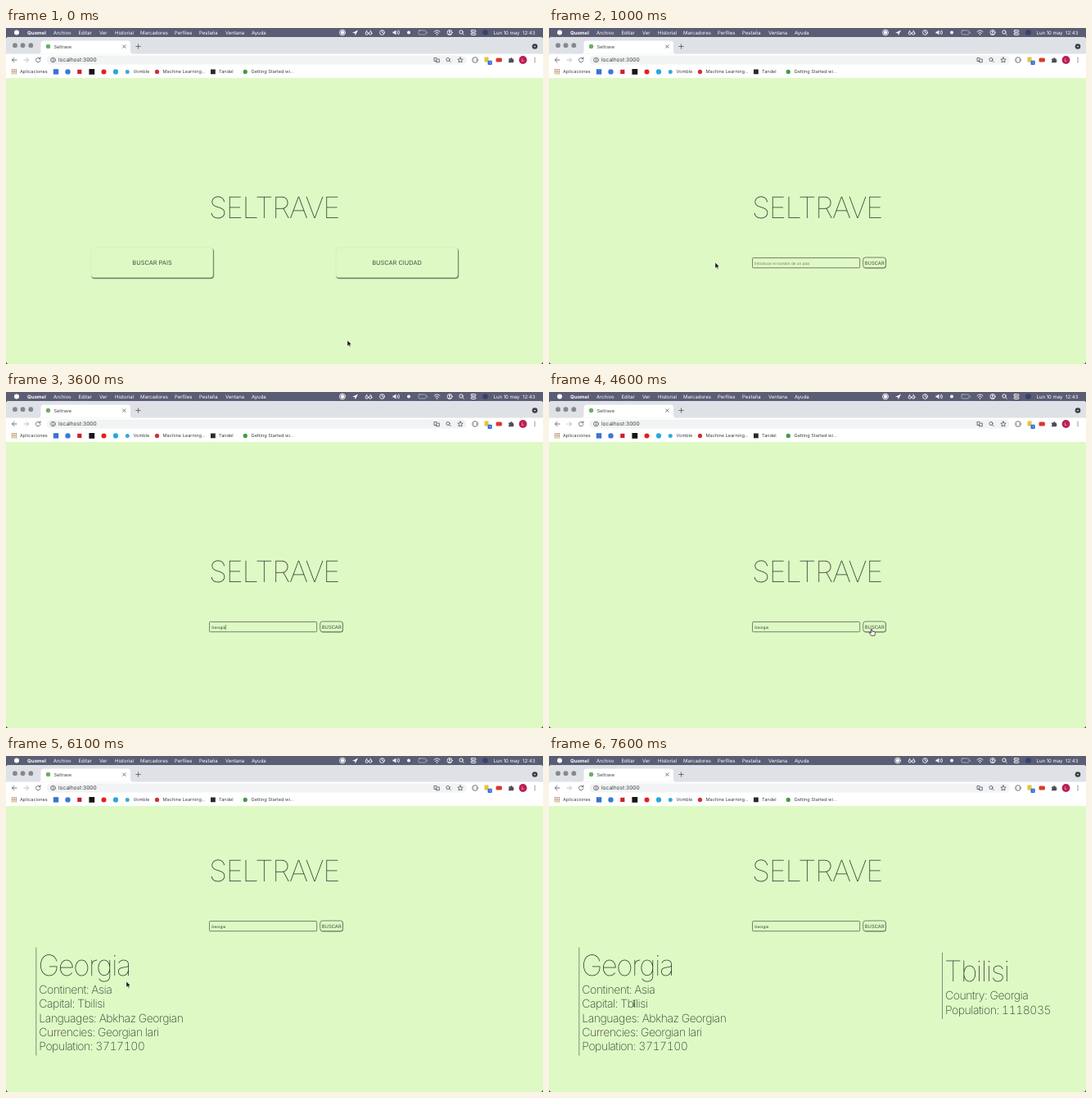
An HTML page for the animation above (8 s loop, 656 by 410 pixels).

```html
<!DOCTYPE html>
<html lang="es">
<head>
<meta charset="utf-8">
<title>Seltrave</title>
<style>
html, body { margin: 0; width: 100%; height: 100%; overflow: hidden; background: #2b2d3f; }
svg { display: block; width: 656px; height: 410px; font-family: Inter, "Open Sans", sans-serif; text-rendering: geometricPrecision; }

.menu text { font-size: 6px; fill: #fff; }
.menu .bold { font-weight: 700; }
.bar text { font-size: 5.6px; fill: #3c4043; }
.bar .url { font-size: 6.6px; }
.line { fill: none; stroke: #5f6368; stroke-width: .9; stroke-linecap: round; stroke-linejoin: round; }
.menu .line { stroke: #fff; }

.page { fill: #2f3d31; }
.title { font-size: 36px; font-weight: 100; letter-spacing: -.034em; text-anchor: middle; }
.name { font-size: 35px; font-weight: 100; letter-spacing: -.045em; }
.facts { font-size: 14px; font-weight: 200; letter-spacing: -.034em; font-variant-numeric: tabular-nums; }
.big { font-size: 7.4px; text-anchor: middle; }
.small { font-size: 5.9px; text-anchor: middle; }
.big, .small { fill: #435040; }
.field { font-size: 4.6px; }
.hint { fill: #6f7a6b; }
.box { fill: #dff9c5; stroke: #4f5d48; stroke-width: .75; }
.rule { stroke: #75846c; stroke-width: .9; }

.home, .search, .lift, .country, .city, .hint, .typed, .rec, .loc, .caret,
.arrow, .hand, .beam { animation: 8s step-end infinite; }
.home { animation-name: home; }
.search { animation-name: search; }
.lift { animation-name: lift; }
.country { animation-name: country; }
.city { animation-name: city; }
.hint { animation-name: hint; }
.typed { animation-name: typed; }
.rec { animation-name: rec; }
.loc { animation-name: loc; }
.caret { animation-name: caret; }
.arrow { animation-name: arrow; }
.hand { animation-name: hand; }
.beam { animation-name: beam; }
.cursor { animation: move 8s ease-in-out infinite; }

/* Each letter stays on until its hidden parent takes over in the next loop. */
.typed tspan { fill-opacity: 0; animation: letter 8s step-end infinite var(--at); }
@keyframes letter { 0% { fill-opacity: 1 } 68% { fill-opacity: 0 } }

@keyframes home { 0% { visibility: visible } 12.5% { visibility: hidden } }
@keyframes search { 0% { visibility: hidden } 12.5% { visibility: visible } }
@keyframes lift { 0% { transform: translateY(0) } 60% { transform: translateY(-79px) } }
@keyframes country { 0% { visibility: hidden } 60% { visibility: visible } }
@keyframes city { 0% { visibility: hidden } 86.25% { visibility: visible } }
@keyframes hint { 0% { visibility: hidden } 12.5% { visibility: visible } 32.5% { visibility: hidden } }
@keyframes typed { 0% { visibility: hidden } 32.5% { visibility: visible } }
@keyframes rec { 0% { transform: translateX(0) } 78.75% { transform: translateX(15px) } }
@keyframes loc { 0% { visibility: visible } 78.75% { visibility: hidden } }
@keyframes caret {
  0% { visibility: hidden; transform: translateX(0) }
  28.75% { visibility: visible; transform: translateX(0) }
  32.5% { visibility: visible; transform: translateX(3.4px) }
  36.25% { visibility: visible; transform: translateX(6.1px) }
  37.5% { visibility: visible; transform: translateX(8.9px) }
  38.75% { visibility: visible; transform: translateX(10.6px) }
  40% { visibility: visible; transform: translateX(13.4px) }
  41.25% { visibility: visible; transform: translateX(14.5px) }
  43.75% { visibility: visible; transform: translateX(17.2px) }
  50% { visibility: hidden; transform: translateX(17.2px) }
}
@keyframes arrow {
  0% { visibility: visible } 7.5% { visibility: hidden }
  12.5% { visibility: visible } 22.5% { visibility: hidden }
  60% { visibility: visible } 78.75% { visibility: hidden }
}
@keyframes hand {
  0% { visibility: hidden } 7.5% { visibility: visible } 12.5% { visibility: hidden }
  54.5% { visibility: visible } 60% { visibility: hidden }
}
@keyframes beam {
  0% { visibility: hidden } 22.5% { visibility: visible } 32.5% { visibility: hidden }
  48.75% { visibility: visible } 54.5% { visibility: hidden } 78.75% { visibility: visible }
}
@keyframes move {
  0% { transform: translate(417px, 381px) }
  11.25%, 18.75% { transform: translate(203px, 286px) }
  25%, 48.75% { transform: translate(272px, 283px) }
  56.25%, 63.75% { transform: translate(394px, 289px) }
  66.25%, 70% { transform: translate(215px, 285px) }
  76.25% { transform: translate(147px, 275px) }
  80%, 100% { transform: translate(104px, 302px) }
}
</style>
</head>
<body>
<svg viewBox="0 0 656 410">
  <rect width="656" height="410" fill="#2b2d3f"/>

  <g class="menu">
    <rect width="656" height="16" fill="#5a5d73"/>
    <circle cx="13" cy="5.5" r="3" fill="#fff"/>
    <text class="bold" x="26" y="8">Quomel</text>
    <text x="58" y="8">Archivo</text>
    <text x="88.5" y="8">Editar</text>
    <text x="114" y="8">Ver</text>
    <text x="133" y="8">Historial</text>
    <text x="164" y="8">Marcadores</text>
    <text x="206" y="8">Perfiles</text>
    <text x="236" y="8">Pestaña</text>
    <text x="268" y="8">Ventana</text>
    <text x="300" y="8">Ayuda</text>
    <g class="rec">
      <circle cx="411" cy="5.5" r="3.5" class="line"/>
      <circle cx="411" cy="5.5" r="2.3" fill="#fff"/>
    </g>
    <path class="loc" d="M423 6 430 2.5 426.7 9.3 426.3 6.2Z" fill="#fff"/>
    <g class="line">
      <circle cx="440.8" cy="6.5" r="1.7"/><circle cx="445.2" cy="6.5" r="1.7"/>
      <path d="M440 4.5 441 3M446 4.5 445 3"/>
      <circle cx="459.5" cy="5.5" r="2.9"/><path d="M459.5 3.8V5.5L461 6.3"/>
      <path d="M478 4Q479 5.5 478 7M479.7 3Q481.5 5.5 479.7 8"/>
      <g opacity=".5"><rect x="504" y="3" width="9" height="5" rx="1.2"/><path d="M514.6 5V6"/></g>
      <path d="M523 4.5Q526.5 1.3 530 4.5M524.5 6.2Q526.5 4.3 528.5 6.2"/>
      <circle cx="542" cy="5.5" r="3"/><path d="M540.3 7.7Q542 5.7 543.7 7.7"/>
      <circle cx="556" cy="5" r="2.2"/><path d="M557.7 6.7 559.3 8.3"/>
      <rect x="568" y="2.7" width="6" height="2.2" rx="1.1"/><rect x="568" y="6.3" width="6" height="2.2" rx="1.1"/>
    </g>
    <path d="M472.5 4.5H474L476.3 2.5V8.5L474 6.5H472.5Z" fill="#fff"/>
    <circle cx="492" cy="5.5" r="2" fill="#fff"/>
    <circle cx="526.5" cy="8" r=".8" fill="#fff"/>
    <circle cx="542" cy="4.7" r="1.1" fill="#fff"/>
    <circle cx="585.5" cy="5.5" r="3.3" fill="#35436f"/>
    <text x="595.5" y="8">Lun 10 may</text>
    <text x="631" y="8">12:43</text>
  </g>

  <rect y="11" width="656" height="399" rx="3.5" fill="#dff9c5"/>
  <path d="M0 61V15Q0 11 4 11H652Q656 11 656 15V61Z" fill="#fff"/>
  <path d="M0 31.5V15Q0 11 4 11H652Q656 11 656 15V31.5Z" fill="#dee1e6"/>
  <path d="M39 31.5Q42.5 31.5 42.5 28V19Q42.5 15.5 46 15.5H148.5Q152 15.5 152 19V28Q152 31.5 155.5 31.5Z" fill="#fff"/>

  <g class="bar">
    <g fill="#85888d">
      <circle cx="11" cy="21.2" r="2.9"/><circle cx="20.5" cy="21.2" r="2.9"/><circle cx="30.3" cy="21.2" r="2.9"/>
    </g>
    <circle cx="51.5" cy="22.5" r="2.7" fill="#6cae66"/>
    <text x="58.5" y="24.5">Seltrave</text>
    <path class="line" d="M142.7 20.9 146.1 24.3M146.1 20.9 142.7 24.3M158.8 22.5H164.2M161.5 19.8V25.2" stroke="#333"/>
    <circle cx="646" cy="22.5" r="3.3" fill="#3c4043"/>
    <path d="M644.7 22 646 23.5 647.3 22Z" fill="#fff"/>

    <rect x="49.5" y="33.5" width="513" height="11" rx="5.5" fill="#f1f3f4"/>
    <g class="line">
      <path d="M13 39H7.5M10 36.4 7.4 39 10 41.6"/>
      <path d="M22 39H27.5M25 36.4 27.6 39 25 41.6" stroke="#b5b8bc"/>
      <path d="M41.6 37.4A2.8 2.8 0 1 0 42 39.7M42 35.8V37.8H40"/>
      <circle cx="57.5" cy="39" r="2.8"/><path d="M57.5 38.8V40.5M57.5 37.4V37.5"/>
      <path d="M526 36.5H523V40.5H526"/><rect x="526" y="38" width="3.3" height="3.8"/>
      <circle cx="540" cy="38.5" r="2.1"/><path d="M541.6 40.1 543.2 41.7"/>
      <path d="M555 35.9 555.9 38 558.2 38.2 556.5 39.7 557 42 555 40.8 553 42 553.5 39.7 551.8 38.2 554.1 38Z"/>
      <circle cx="573" cy="39" r="3.3"/><path d="M571.5 39.1H571.6M574.4 39.1H574.5"/>
    </g>
    <text class="url" x="64" y="41.2">localhost:3000</text>
    <rect x="584.5" y="35.5" width="5" height="6" fill="#e8c23b"/>
    <rect x="588.5" y="39.8" width="5.2" height="5.2" rx="1" fill="#2b6fdb"/>
    <text x="590.2" y="44" style="font-size:4px;fill:#fff">1</text>
    <rect x="598.5" y="36.5" width="7.4" height="5" rx="1.5" fill="#d93832"/>
    <path d="M614 37.5H616A1.2 1.2 0 0 1 618.4 37.5H619.8V39A1.2 1.2 0 0 1 619.8 41.2V42.3H614V40.8A1 1 0 0 0 614 39Z" fill="#4b4f54"/>
    <circle cx="631.5" cy="39" r="4.9" fill="#bd2051"/>
    <text x="630" y="41" style="fill:#fff;font-size:5px">L</text>
    <g fill="#5f6368">
      <circle cx="646" cy="36.8" r=".7"/><circle cx="646" cy="39" r=".7"/><circle cx="646" cy="41.2" r=".7"/>
    </g>

    <g fill="none" stroke-width="1.5" stroke-dasharray="1.5 .9">
      <path d="M6.8 51H13.1" stroke="#d9574b"/><path d="M6.8 53.4H13.1" stroke="#4b8b57"/><path d="M6.8 55.8H13.1" stroke="#dfa82f"/>
    </g>
    <text x="17" y="55.3">Aplicaciones</text>
    <rect x="57.8" y="50.2" width="6.4" height="6.4" fill="#3973d4"/>
    <circle cx="75.5" cy="53.4" r="3.2" fill="#3c78d8"/>
    <rect x="87.2" y="50.8" width="5.2" height="5.2" fill="#cf1f2b"/>
    <rect x="101.4" y="50" width="6.8" height="6.8" fill="#171717"/>
    <circle cx="119.5" cy="53.4" r="3" fill="#e3201f"/>
    <circle cx="134" cy="53.4" r="3.1" fill="#25a9dc"/>
    <circle cx="148.3" cy="53.4" r="2.5" fill="#38a9d6"/>
    <text x="155.5" y="55.3">Vomble</text>
    <circle cx="184.5" cy="53.4" r="2.6" fill="#cf3036"/>
    <text x="191.5" y="55.3">Machine Learning...</text>
    <rect x="250" y="50.5" width="5.8" height="5.8" fill="#292b26"/>
    <text x="260" y="55.3">Tandel</text>
    <circle cx="292.3" cy="53.4" r="2.6" fill="#439b45"/>
    <text x="299.5" y="55.3">Getting Started wi...</text>
  </g>

  <g class="page">
    <g class="lift">
      <text class="title" x="327.5" y="232">SELTRAVE</text>
      <g class="search">
        <rect class="box" x="248.5" y="280.5" width="131.2" height="12.2" rx="1"/>
        <text class="field hint" x="251" y="288.5">Introduce el nombre de un pais</text>
        <text class="field typed" x="251" y="288.5"><tspan style="--at:2.6s">G</tspan><tspan style="--at:2.9s">e</tspan><tspan style="--at:3s">o</tspan><tspan style="--at:3.1s">r</tspan><tspan style="--at:3.2s">g</tspan><tspan style="--at:3.3s">i</tspan><tspan style="--at:3.5s">a</tspan></text>
        <rect class="caret" x="250.8" y="284" width=".6" height="6"/>
        <rect x="384.1" y="280.5" width="27.9" height="12.9" rx="3.2" fill="#84937a"/>
        <rect class="box" x="383.7" y="280" width="27.8" height="12.7" rx="3"/>
        <text class="small" x="397.7" y="288.5">BUSCAR</text>
      </g>
    </g>

    <g class="home">
      <g id="button">
        <rect x="104" y="268.5" width="150.3" height="37.7" rx="4" fill="#a9ba98"/>
        <rect x="104.3" y="269" width="149.5" height="36.7" rx="4" fill="#5f6e56"/>
        <rect x="104" y="268" width="148.9" height="36.6" rx="3.5" fill="#dff9c5" stroke="#cbe2b3" stroke-width=".4"/>
      </g>
      <use href="#button" x="299"/>
      <text class="big" x="178.5" y="289">BUSCAR PAIS</text>
      <text class="big" x="477.5" y="289">BUSCAR CIUDAD</text>
    </g>

    <g class="country">
      <path class="rule" d="M36.8 233.5V365.5"/>
      <text class="name" x="39.5" y="268">Georgia</text>
      <g class="facts">
        <text x="40.3" y="290">Continent: Asia</text>
        <text x="40.3" y="307.3">Capital: Tbilisi</text>
        <text x="40.3" y="324.6">Languages: Abkhaz Georgian</text>
        <text x="40.3" y="341.9">Currencies: Georgian lari</text>
        <text x="40.3" y="359.2">Population: 3717100</text>
      </g>
    </g>

    <g class="city">
      <path class="rule" d="M480.5 240V321"/>
      <text class="name" x="483" y="275">Tbilisi</text>
      <g class="facts">
        <text x="484" y="297.2">Country: Georgia</text>
        <text x="484" y="314.5">Population: 1118035</text>
      </g>
    </g>
  </g>

  <g class="cursor">
    <path class="arrow" d="M0 0V7.3L1.7 5.8 2.8 8.3 4 7.8 2.9 5.3H5.1Z" fill="#111" stroke="#fff" stroke-width=".5"/>
    <path class="hand" d="M-.7 .7Q0-.4 .7 .7V3L4 3.8Q4.8 4.2 4.5 5.5L3.7 8.3H-.3L-2.7 5.2Q-2.8 4.2-1.7 4.5L-.7 5.2Z" fill="#fff" stroke="#111" stroke-width=".7"/>
    <path class="beam" d="M-1.5-3.8Q0-3.8 0-2.9Q0-3.8 1.5-3.8M0-2.9V2.9M-1.5 3.8Q0 3.8 0 2.9Q0 3.8 1.5 3.8M-.8 .9H.8" fill="none" stroke="#1c1c1c" stroke-width=".7"/>
  </g>
</svg>
</body>
</html>
```
